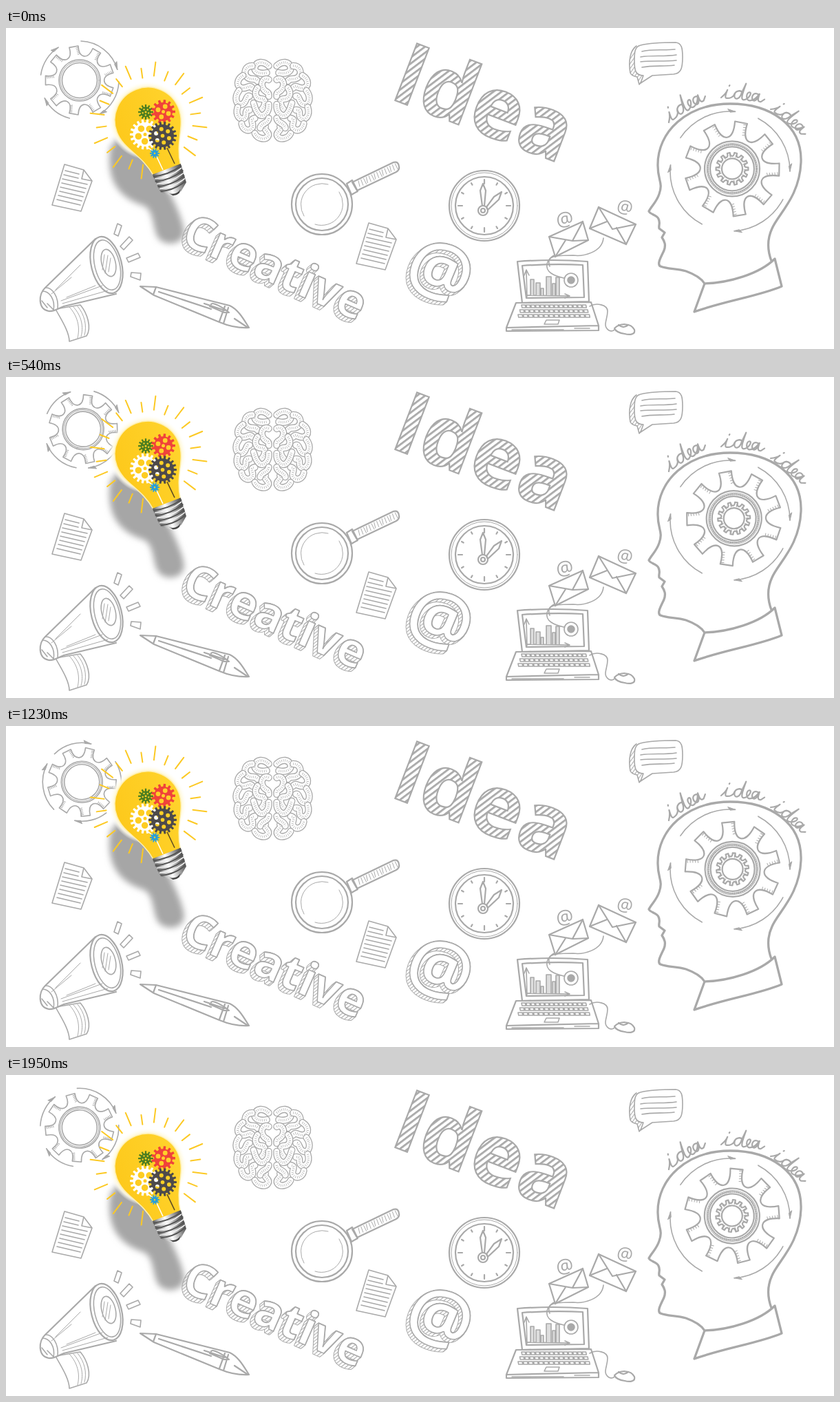
An HTML page that plays this animation: 1203 px wide and 466 px high, repeating every 1980 ms.

```html
<!DOCTYPE html>
<html lang="en">
<head>
<meta charset="utf-8">
<title>Idea</title>
<style>
html, body { margin: 0; width: 100%; height: 100%; overflow: hidden; background: #fff; }
svg { display: block; width: 1203px; height: 466px; }
.ink { fill: none; stroke: #a9a9a9; stroke-width: 1.6; stroke-linecap: round; stroke-linejoin: round; }
.bold { stroke-width: 2.2; }
.thin { stroke-width: 1; }
.white { fill: #fff; }
.solid { fill: #a9a9a9; }
text { font-family: "Open Sans", sans-serif; font-weight: 700; }
</style>
</head>
<body>
<svg viewBox="0 0 1203 466">
<defs>
  <pattern id="stripes" width="7" height="7" patternUnits="userSpaceOnUse" patternTransform="rotate(-58)">
    <rect width="7" height="7" fill="#fff"/><rect width="7" height="2.8" fill="#a9a9a9"/>
  </pattern>
  <pattern id="hatch" width="4" height="4" patternUnits="userSpaceOnUse" patternTransform="rotate(-55)">
    <rect width="4" height="4" fill="#fff"/><rect width="4" height="1" fill="#a9a9a9"/>
  </pattern>
  <radialGradient id="glow">
    <stop offset=".8" stop-color="#fff3c0"/><stop offset=".9" stop-color="#fffbe8" stop-opacity=".9"/>
    <stop offset="1" stop-color="#fff" stop-opacity="0"/>
  </radialGradient>
  <linearGradient id="glass"><stop offset="0" stop-color="#fdc91c"/><stop offset="1" stop-color="#ffd32c"/></linearGradient>
  <linearGradient id="metal">
    <stop offset="0" stop-color="#555"/><stop offset=".2" stop-color="#bbb"/><stop offset=".42" stop-color="#fff"/>
    <stop offset=".68" stop-color="#aaa"/><stop offset="1" stop-color="#444"/>
  </linearGradient>
  <filter id="blur" x="-30%" y="-30%" width="160%" height="160%"><feGaussianBlur stdDeviation="5"/></filter>

  <g id="page" class="ink">
    <path d="M85 198L113 206L125 222L109 266L67 257ZM113 206L110 219L125 222"/>
    <path d="M86 207l20 5M84 213l21 5M82 219l36 8M81 225l35 8M79 231l35 8M78 237l34 8M76 243l34 8M74 249l34 8"/>
  </g>
  <g id="script" class="ink" stroke-width="2">
    <path d="M0 0C4-4 7-8 8-12C6-5 5 0 8 0C12 0 16-2 18-5C20-14 29-14 30-10C28-14 18-13 19-4C20 2 27 0 29-10L34-24C30-8 28 0 33 0C40-2 45-12 40-12C35-10 36 1 42 0C48-1 52-6 54-10C46-14 43-6 46-1C50 2 54-6 55-11C53-3 53 1 58 0L63-4M10-18l.5-1" style="stroke-width:2.2"/>
  </g>
</defs>

<g id="cogSmall" class="ink"></g>
<g id="brain" fill="none" stroke-linecap="round"></g>

<text transform="translate(555 101) rotate(21)" font-size="124" fill="url(#stripes)" stroke="#a9a9a9" stroke-width="2.2">Idea</text>
<g id="creative"></g>
<g id="atSign"></g>

<use href="#page"/><use href="#page" x="442" y="85"/>

<!-- speech bubble -->
<g class="ink">
  <path d="M916 26C907 32 904 48 907 65C909 70 914 70 917 71L920 82L930 71" fill="url(#hatch)"/>
  <path class="white" d="M922 25C938 21 960 21 973 21C982 22 983 30 983 42C983 58 981 66 970 67L939 69L922 80L926 69C915 69 913 62 913 48C913 36 913 27 922 25Z"/>
  <path d="M924 34C940 30 955 33 972 31M922 42C940 39 955 42 974 39M922 49C940 47 955 49 974 47M924 57C940 54 955 56 971 54"/>
</g>

<!-- magnifier -->
<g class="ink bold">
  <circle cx="459" cy="256" r="44"/><circle cx="459" cy="256" r="38"/>
  <path class="thin" d="M433 273A31 31 0 0 1 468 227M484 238A31 31 0 0 1 449 285"/>
  <path class="white" d="M495 226L503 221L511 237L502 242ZM503 224L563 195Q570 193 571 201Q572 206 567 209L510 236Z"/>
  <path id="grip" class="thin"/>
</g>

<!-- clock -->
<g class="ink bold">
  <circle cx="695" cy="258" r="51"/><circle cx="695" cy="258" r="48" class="thin"/><circle cx="695" cy="258" r="42"/>
  <path id="ticks"/>
  <circle cx="693" cy="265" r="7"/><circle cx="693" cy="265" r="3"/>
  <path d="M692 258L689 236L693 226L697 236L695 258ZM698 260L709 245L720 238L716 249L700 264Z"/>
</g>

<!-- megaphone -->
<g class="ink">
  <path class="white" d="M72 408C78 420 92 440 92 455L117 447C125 435 118 414 108 402Z"/>
  <path class="thin" d="M92 405C104 418 108 434 104 450M98 405C110 418 113 434 109 448M104 404C114 416 118 432 114 446"/>
  <path class="white bold" d="M130 306L57 377C47 386 46 408 62 411C70 412 76 407 84 404L160 386"/>
  <path d="M57 377C67 376 77 390 75 408M53 382C63 382 72 394 69 410M60 400l9 9M52 396l8 10"/>
  <ellipse class="white bold" cx="146" cy="344" rx="22" ry="42" transform="rotate(-14 146 344)"/>
  <ellipse cx="147" cy="344" rx="18" ry="37" transform="rotate(-14 147 344)"/>
  <ellipse cx="149" cy="341" rx="10" ry="20" transform="rotate(-14 149 341)"/>
  <path class="thin" d="M80 396L140 374M82 400L148 381M88 391L130 374M66 386L95 362M72 380L108 344M143 329l-3 22M148 330l-4 26M152 334l-3 20"/>
  <path d="M162 284L168 287L163 302L157 299ZM179 303L184 308L171 322L166 317ZM192 327L195 333L178 340L175 334ZM182 355L196 356L195 366L181 361Z"/>
</g>

<!-- pen -->
<g class="ink bold">
  <path class="white" d="M195 375L218 376L325 403C338 409 346 424 353 435C338 436 322 432 310 427L215 388Z"/>
  <path d="M218 376L214 387M222 383L298 408M288 400L318 410M298 401C300 397 316 406 324 413L317 413L296 404M318 404L310 426M323 406L316 429M332 422L350 434"/>
</g>

<!-- laptop, mail and mouse -->
<g class="ink">
  <path d="M798 329C784 336 782 349 792 356S812 362 820 366M868 305C866 326 838 332 824 330C800 330 784 330 790 346"/>
  <path class="white bold" d="M789 303L838 281L846 308L798 332ZM861 260L915 285L901 314L848 291Z"/>
  <path class="bold" d="M789 303L823 309L838 281M798 332L813 308M846 308L824 309M861 260L881 292L915 285M848 291L873 281M901 314L887 290"/>
  <path class="bold" d="M743 339Q794 335 845 339L847 397L750 399ZM750 345Q796 342 838 344L840 391L756 392Z"/>
  <path d="M757 390L756 352m-3 7l3-8l4 8M757 388L818 389m-6-3l7 3l-7 3"/>
  <path fill="#ddd" d="M762 388V365h5V388M770 388V370h6V388M777 388V378h4V388M785 388V361h7V388M794 388V371h4V388M799 388V362h5V388"/>
  <circle class="white" cx="821" cy="366" r="10"/><circle cx="821" cy="366" r="5" class="solid"/>
  <path class="white bold" d="M741 399L850 398L861 432L727 435ZM727 435V440L861 439V432"/>
  <path id="keys"/>
  <path class="white" d="M785 424L804 424L802 430H782Z"/><path d="M735 438H810M826 436h22"/>
  <path d="M848 404C858 398 874 402 874 411C874 424 866 432 876 439C882 442 885 437 888 434"/>
  <path class="white bold" d="M884 436C892 428 908 428 913 438C915 445 906 446 899 444C892 443 886 441 884 436ZM890 431C896 436 900 434 904 431"/>
</g>
<text transform="translate(801 289) rotate(-10)" font-size="28" fill="#a9a9a9" style="font-weight:400">@</text>
<text transform="translate(886 266) rotate(12)" font-size="26" fill="#a9a9a9" style="font-weight:400">@</text>

<!-- head -->
<g class="ink">
  <path style="stroke-width:3.3" d="M1112 338C1106 322 1106 306 1113 291C1122 270 1153 245 1155 195C1157 140 1110 110 1052 110C990 110 946 150 947 200C947 222 955 224 949 241C945 253 938 258 934 266C936 271 946 271 948 277C951 283 948 286 949 291L957 297L953 304C957 310 959 315 956 323C952 332 945 343 951 346C960 350 975 349 988 353C1002 358 1010 363 1015 371M1015 371C1050 370 1095 357 1117 335L1127 375C1095 389 1045 396 1000 412Z"/>
  <g id="headArcs" transform="translate(1052 208)"></g>
</g>
<use href="#script" transform="translate(963 137) rotate(-32) scale(1.03)"/>
<use href="#script" transform="translate(1039 101) rotate(6)"/>
<use href="#script" transform="translate(1111 118) rotate(39) scale(.98)"/>
<g id="cogHead" class="ink bold"></g>

<!-- light bulb -->
<g id="bulb">
  <path filter="url(#blur)" fill="#a6a6a6" d="M152 172C142 232 176 250 200 258C216 265 212 292 222 306C236 320 264 312 258 290C252 262 236 240 226 210L172 150Z"/>
  <circle cx="206" cy="134" r="57" fill="url(#glow)"/>
  <path id="rays" fill="none" stroke="#fcc923" stroke-width="2" stroke-linecap="round"/>
  <g transform="translate(206 134) rotate(-21)">
    <path d="M-48 0A48 48 0 1 1 48 0C48 28 26 42 21 78H-21C-26 42-48 28-48 0Z" fill="url(#glass)" stroke="#fff0b0" stroke-width="1.5"/>
    <path d="M-22 76H22L20 104L9 113Q0 117-9 113L-20 104Z" fill="url(#metal)"/>
    <path d="M-22 79Q0 85 22 79M-22 87Q0 93 22 86M-21 95Q0 101 21 94M-19 103Q0 109 19 102" fill="none" stroke="#555" stroke-width="2"/>
    <path d="M-21 83Q0 89 21 82M-21 91Q0 97 21 90M-20 99Q0 105 20 98" fill="none" stroke="#f4f4f4" stroke-width="1.6"/>
    <path d="M-9 110Q0 117 9 110L5 115Q0 117-5 115Z" fill="#444"/>
  </g>
  <path d="M219 187L228 206M207 174L213 179" stroke="#fff" stroke-width="1.5"/>
  <path d="M234 174L245 197" stroke="#5b4a24" stroke-width="1.5"/>
  <g id="bulbCogs"></g>
</g>
</svg>
<script>
const $ = id => document.getElementById(id);
const rad = deg => deg * Math.PI / 180;
const at = (r, deg) => `${(r * Math.cos(rad(deg))).toFixed(2)} ${(r * Math.sin(rad(deg))).toFixed(2)}`;
const range = n => [...Array(n).keys()];

// Hand-drawn cog: flat teeth with round valleys, plus hatching on one flank
function sketchCog(teeth, outer, valley, phase) {
  const step = 360 / teeth;
  let edge = '', hatch = '';
  for (const i of range(teeth)) {
    const a = phase + i * step, deg = f => a + f * step;
    edge += `${i ? 'L' : 'M'}${at(outer, deg(-.19))}L${at(outer, deg(.19))}` +
      `C${at(valley, deg(.2))} ${at(valley, deg(.8))} ${at(outer, deg(.81))}`;
    for (const j of range(5)) {
      const r = outer - 2 - j * (outer - valley) * .13;
      hatch += `M${at(r, deg(.19 + j * .01))}L${at(r - 1, deg(.09 + j * .015))}`;
    }
  }
  return `<path d="${edge}Z"/><path class="thin" d="${hatch}"/>`;
}

// Arc running clockwise from one angle to another, with a pointed head
const arrow = (r, from, to) => {
  const back = to - 620 / r;
  return `<path d="M${at(r, from)}A${r} ${r} 0 0 1 ${at(r, to)}"/>` +
    `<path class="solid thin" d="M${at(r, to)}L${at(r + 3.5, back)}L${at(r - 1, back + 2)}Z"/>`;
};
const ring = (r, cls = '') => `<circle r="${r}" class="${cls}"/>`;

$('cogSmall').innerHTML = sketchCog(9, 50, 32, 180) + ring(30) + ring(25.5) + ring(28, 'thin') +
  [[188, 237], [-88, -16], [105, 153], [2, 60]].map(([a, b]) => arrow(57, a, b)).join('');

$('cogHead').innerHTML = sketchCog(9, 69, 40, 1) + ring(40) + ring(37, 'thin') +
  '<circle r="35" stroke-dasharray="1 2"/>' + ring(32) +
  sketchCog(14, 23.5, 17, 0) + ring(15);

$('headArcs').innerHTML = [[118, 186], [214, 275], [-62, 0], [28, 86]]
  .map(([a, b]) => arrow(87, a, b)).join('');

// Brain: overlapping tubes, mirrored into two lobes
const folds = ['M5 8C14 0 24 2 26 10S16 20 8 18', 'M30 8C40 8 44 18 38 24S26 24 22 30',
  'M44 22C54 28 54 38 46 40S34 34 30 40', 'M50 44C58 54 54 66 46 64S40 50 34 52',
  'M52 68C56 80 48 88 42 84S44 72 34 72', 'M46 92C44 102 34 104 30 98S36 86 26 84',
  'M26 106C22 114 10 116 6 110S14 102 10 96', 'M5 28C12 24 18 32 14 40S4 44 5 52',
  'M22 40C28 48 24 56 16 56S10 66 16 72', 'M5 64C4 76 14 84 20 78S26 66 28 62',
  'M5 84C6 92 16 90 18 98'];
const lobe = folds.map(d => `<path d="${d}" stroke="#a9a9a9" stroke-width="10.5"/>
  <path d="${d}" stroke="#fff" stroke-width="7.8"/>
  <path d="${d}" stroke="#b4b4b4" stroke-width="3.6" stroke-linecap="butt" stroke-dasharray=".8 2"/>`).join('');
$('brain').innerHTML = [-1, 1].map(s =>
  `<g transform="translate(${387.5 + s} 47) scale(${s * .96} 1)">${lobe}</g>`).join('');

// Outlined letters with a hatched side falling to the lower left
function blockText(text, x, y, turn, size, depth) {
  const layer = (k, fill, stroke, width) => `<text transform="translate(${x - k} ${y + k * .8}) rotate(${turn})"
    font-size="${size}" fill="${fill}" stroke="${stroke}" stroke-width="${width}" stroke-linejoin="round">${text}</text>`;
  const steps = range(depth + 1).reverse();
  return steps.map(k => layer(k, '#a9a9a9', '#a9a9a9', 2)).join('') +
    steps.map(k => layer(k, 'url(#hatch)', 'none', 0)).join('') +
    layer(0, '#fff', '#a9a9a9', 1.6);
}
$('creative').innerHTML = blockText('Creative', 252, 312, 23.7, 68, 6);
$('atSign').innerHTML = blockText('@', 574, 370, 20, 106, 5);

$('grip').setAttribute('d', range(15).map(i => `M${512 + i * 3.8} ${222 - i * 1.8}l${2 + i % 3} 8`).join(''));
$('ticks').setAttribute('transform', 'translate(695 258)');
$('ticks').setAttribute('d', range(12).map(i => `M${at(i % 3 ? 35 : 32, i * 30)}L${at(38, i * 30)}`).join(''));
$('keys').setAttribute('d', range(3).map(row => {
  const y = 402 + row * 7, x = 749 - row * 2.5, w = (95 + row * 5) / 14;
  return range(14).map(i => `M${x + i * w} ${y}h${w - 1.5}l.8 4h${1.5 - w}Z`).join('');
}).join(''));

$('rays').setAttribute('d', range(24).filter(k => k < 9 || k > 11).map(k => {
  const a = -83 + k * 15;
  return `M${at(k % 2 ? 62 : 65, a)}L${at(k % 2 ? 76 : 85, a)}`;
}).join(''));
$('rays').setAttribute('transform', 'translate(207 134)');

// Flat cog with holes cut through it
function flatCog(x, y, outer, root, teeth, color, hub, holes = 0, orbit = 0, hole = 0) {
  const step = 360 / teeth;
  const circle = (cx, cy, r) => `M${cx - r} ${cy}a${r} ${r} 0 1 0 ${2 * r} 0a${r} ${r} 0 1 0 ${-2 * r} 0Z`;
  const edge = range(teeth).map(i => {
    const a = i * step;
    return `${i ? 'L' : 'M'}${at(root, a - step * .28)}L${at(outer, a - step * .2)}L${at(outer, a + step * .2)}L${at(root, a + step * .28)}`;
  }).join('') + 'Z';
  const cuts = range(holes).map(i => {
    const a = rad(i * 360 / holes + 20);
    return circle(orbit * Math.cos(a), orbit * Math.sin(a), hole);
  }).join('');
  return `<path transform="translate(${x} ${y})" fill="${color}" fill-rule="evenodd" d="${edge}${circle(0, 0, hub)}${cuts}"/>`;
}
$('bulbCogs').innerHTML =
  flatCog(202, 154.5, 22, 17.5, 18, '#fff', 2.5, 5, 10, 4.8) +
  flatCog(203, 122, 11, 7.5, 12, '#4c7d20', 1.5, 5, 4.5, 1.2) +
  flatCog(228.5, 121.5, 17.5, 13.5, 13, '#f0433a', 2.5, 4, 8, 3.4) +
  flatCog(227.5, 156.5, 20.5, 16.5, 18, '#4d4a4b', 2.8, 6, 10, 3) +
  flatCog(216, 182, 7, 4.8, 10, '#2a9fd8', 1.2);

const LOOP = 1980, STEP = 30, PEAK = .4, LIFT = 32;
function draw(now) {
  const p = Math.floor(now % LOOP / STEP) * STEP / LOOP;
  const rise = p < PEAK ? p / PEAK : (1 - p) / (1 - PEAK);
  $('bulb').setAttribute('transform', `translate(0 ${-LIFT * rise})`);
  // Both cogs turn about a pivot slightly off their centres
  $('cogSmall').setAttribute('transform', `translate(109.7 78) rotate(${p * 360}) translate(-2.7 -2)`);
  $('cogHead').setAttribute('transform', `translate(1056 206) rotate(${p * 360}) translate(-1 -1.6)`);
}
const start = performance.now();
function tick() {
  draw(performance.now() - start);
  requestAnimationFrame(tick);
}
tick();
</script>
</body>
</html>
```
